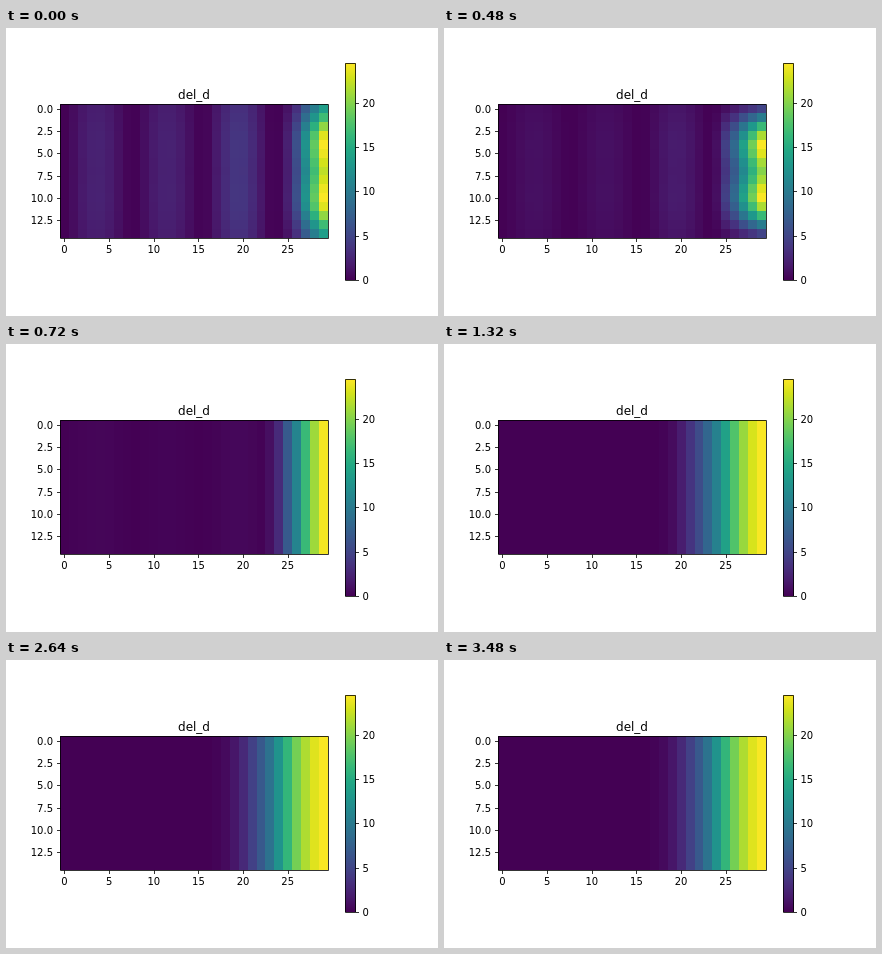
These frames come from a looping animation (432x288 px, 4800 ms). An HTML page with a canvas:

```html
<!DOCTYPE html>
<html lang="en">
<head>
<meta charset="utf-8">
<title>del_d</title>
<style>
  html, body { margin: 0; width: 100%; height: 100%; overflow: hidden; background: #fff; }
  canvas, svg { position: absolute; left: 0; top: 0; width: 432px; height: 288px; }
  text { font: 10px "DejaVu Sans", sans-serif; }
  .title { font-size: 12px; }
  .mid { text-anchor: middle; }
  .end { text-anchor: end; }
  path { fill: none; stroke: #000; stroke-width: .8; }
</style>
</head>
<body>
<canvas id="map" width="432" height="288"></canvas>
<svg id="axes" viewBox="0 0 432 288">
  <path d="M54.5 76.5H322.5V210.5H54.5Z"/>
  <path d="M339.5 35.5H349.5V252.5H339.5Z"/>
  <text class="title mid" x="188" y="70.5">del_d</text>
</svg>
<script>
const COLS = 30, ROWS = 15, LEFT = 54, TOP = 76, CELL = 268 / COLS;
const MAX = 24.55, STEP = 120, LOOP = 4800;
const ctx = document.getElementById('map').getContext('2d');
const axes = document.getElementById('axes');

const viridis = ('440154 481a6c 472f7d 414487 39568c 31688e 2a788e 23888e ' +
  '1f988b 22a884 35b779 54c568 7ad151 a5db36 d2e21b fde725').split(' ')
  .map(hex => [0, 2, 4].map(i => parseInt(hex.slice(i, i + 2), 16)));

const mix = (a, b, p) => a + (b - a) * p;

function color(value) {
  const x = Math.min(1, Math.max(0, value / MAX)) * (viridis.length - 1);
  const i = Math.min(viridis.length - 2, Math.floor(x));
  const rgb = viridis[i].map((v, n) => Math.round(mix(v, viridis[i + 1][n], x - i)));
  return `rgb(${rgb})`;
}

// A pose is a field: faint standing waves, a strong tail at the right end,
// and a vertical profile mirrored about the middle row.
function pose(lobes, tail, profile) {
  const start = COLS - tail.length;
  const column = c => {
    if (c >= start) return tail[c - start];
    const amp = lobes[Math.min(2, Math.floor((c + .3) / 7.9))];
    return amp * Math.abs(Math.sin(Math.PI * (c + .3) / 7.9)) ** 1.5;
  };
  return (c, r) => {
    const shape = profile ? profile[Math.min(r, ROWS - 1 - r)] : 1;
    return column(c) * (1 - (1 - shape) * (c > 23 ? 1 : .3));
  };
}

const flat = [0, 0, 0];
const wide = drift => pose(flat,
  [.2, .6, 1.4, 2.8, 4.7, 6.8, 9.2 + drift, 12.6, 16.2, 19.4, 21.6, 23.4, 24.4]);

const bulge = pose([2.3, 2.3, 3.9], [.2, 2.1, 6, 12.6, 18.6, 24.4],
  [.56, .69, .84, .96, 1, .98, .94, .91]);
const pinch = pose([1, 1, 1.8], [.9, 4.6, 8.4, 14, 19.2, 24.4],
  [.2, .42, .68, .88, 1, .96, .87, .82]);
const narrow = pose([.3, .2, .4], [.9, 2.9, 6.9, 11, 16.6, 21, 24.2]);
const broad = pose(flat, [.2, .7, 1.9, 3.7, 5.6, 8, 10.7, 14, 17.8, 20.8, 23.1, 24.4]);

const keys = [
  [0, bulge], [1, bulge], [4, pinch], [6, narrow], [10, narrow],
  [11, broad], [17, broad], [18, wide(0)], [21, wide(0)],
  [25, wide(.1)], [27, wide(.1)], [29, wide(.15)], [40, wide(.15)]
];

const edge = (origin, i) => Math.round(origin + i * CELL);

function drawField(step) {
  const n = keys.findIndex(([at]) => at > step);
  const [from, a] = keys[n - 1], [to, b] = keys[n];
  const p = (step - from) / (to - from);
  for (let c = 0; c < COLS; c++) {
    for (let r = 0; r < ROWS; r++) {
      const x = edge(LEFT, c), y = edge(TOP, r);
      ctx.fillStyle = color(mix(a(c, r), b(c, r), p));
      ctx.fillRect(x, y, edge(LEFT, c + 1) - x, edge(TOP, r + 1) - y);
    }
  }
}

function drawBar() {
  for (let y = 35; y < 252; y++) {
    ctx.fillStyle = color(MAX * (251.5 - y) / 217);
    ctx.fillRect(339, y, 11, 1);
  }
}

function add(tag, attrs, label = '') {
  const el = document.createElementNS('http://www.w3.org/2000/svg', tag);
  for (const key in attrs) el.setAttribute(key, attrs[key]);
  el.textContent = label;
  axes.append(el);
}

function drawTicks() {
  const snap = v => Math.round(v) + .5;
  for (let v = 0; v <= 25; v += 5) {
    const x = LEFT + (v + .5) * 8.928;
    add('path', { d: `M${snap(x)} 210.5v3.5` });
    add('text', { class: 'mid', x, y: 225 }, v);
  }
  for (let v = 0; v <= 12.5; v += 2.5) {
    const y = 76.32 + (v + .5) * 8.928;
    add('path', { d: `M54.5 ${snap(y)}h-3.5` });
    add('text', { class: 'end', x: 47, y: y + 3.8 }, v.toFixed(1));
  }
  for (let v = 0; v <= 20; v += 5) {
    const y = 252 - v * 217.44 / MAX;
    add('path', { d: `M349.5 ${snap(y)}h3.5` });
    add('text', { x: 356.5, y: y + 3.8 }, v);
  }
}

let shown = -1;
function tick() {
  const step = Math.floor(performance.now() % LOOP / STEP);
  if (step !== shown) drawField(shown = step);
  requestAnimationFrame(tick);
}

drawBar();
drawTicks();
tick();
</script>
</body>
</html>
```
